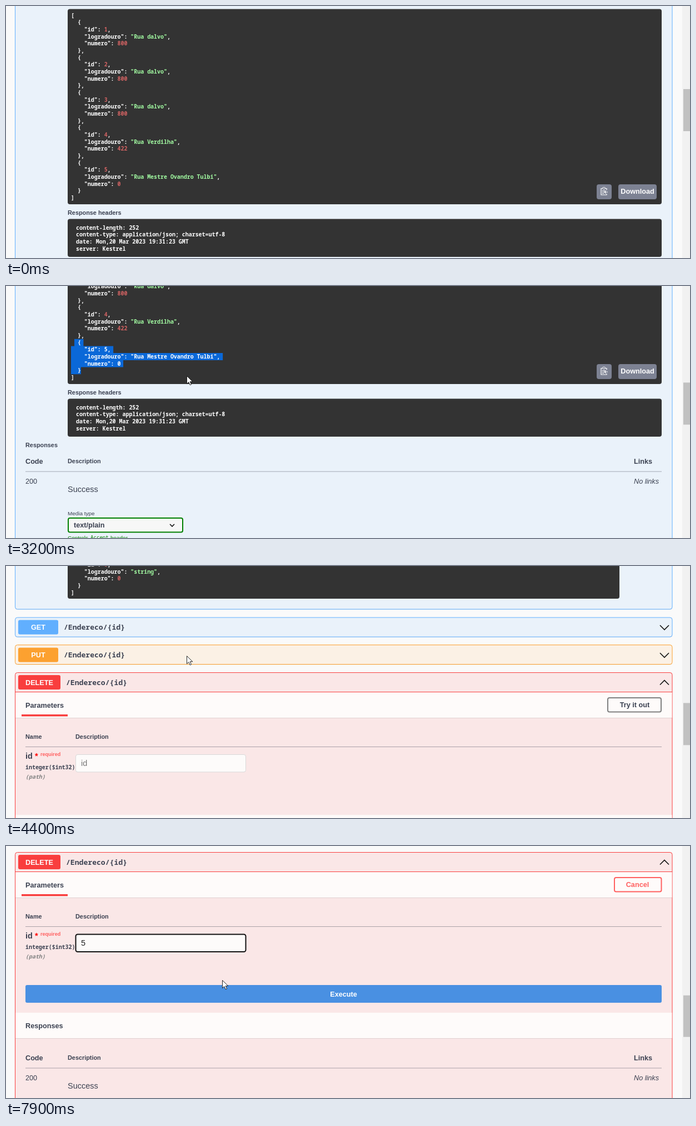
An HTML page for the animation above (8000 ms loop, 1231 by 455 pixels).

```html
<!DOCTYPE html>
<html lang="pt">
<head>
<meta charset="utf-8">
<title>API docs</title>
<style>
  html, body { margin: 0; width: 100%; height: 100%; overflow: hidden; background: #fafafa; }
  svg { display: block; }
  text { font-family: "Liberation Sans", Arial, sans-serif; fill: #3b4151; white-space: pre; }
  .mono { font-family: "Noto Sans Mono", "DejaVu Sans Mono", monospace; }
  .bold { font-weight: 700; }
  .italic { font-style: italic; }
  .mid { text-anchor: middle; }
  .white, .picked tspan { fill: #fff; }
  .str { fill: #a2fca2; }
  .num { fill: #d36363; }
  .green { fill: #008000; }
  .grey { fill: #808080; }
  .red { fill: #f00; }
  .soft { fill: #ff6060; }
</style>
</head>
<body>
<svg id="stage" width="1231" height="455" viewBox="0 0 1231 455"></svg>
<script>
const LOOP = 8000;
const ROW = 12.67, CHAR = 5.97;
const SHIFT = 32.5;
const S10 = 9.05, S11 = 9.95, S12 = 10.86, S14 = 12.67, S16 = 14.48;
const M11 = 9.12, M12 = 9.95, M16 = 13.1;

// Markup helpers; y is the middle of the line of text.
const text = (x, y, size, str, cls = '') =>
  `<text x="${x}" y="${y + size * .36}" font-size="${size}" class="${cls}">${str}</text>`;
const bold = (x, y, size, str, cls = '') => text(x, y, size, str, 'bold ' + cls);
const rect = (x, y, w, h, fill, r = 0, extra = '') =>
  `<rect x="${x}" y="${y}" width="${w}" height="${h}" rx="${r}" fill="${fill}" ${extra}/>`;
const stroke = (d, color, width = 1) =>
  `<path d="${d}" fill="none" stroke="${color}" stroke-width="${width}"/>`;
const rule = y => rect(35, y, 1145, 1, '#3b4151', 0, 'opacity=".42"');
const paint = line => line.replace(/: (".*?"|\d+)/, (_, v) =>
  `: <tspan class="${v[0] === '"' ? 'str' : 'num'}">${v}</tspan>`);
const lines = (x, y, rows, cls = '') => rows.map((row, i) =>
  text(x, y + i * ROW, M12, row, 'mono bold white ' + cls)).join('');
const json = (x, y, rows, cls) => lines(x, y, rows.map(paint), cls);

const record = (id, street, number) => [
  '  {', `    "id": ${id},`, `    "logradouro": "${street}",`, `    "numero": ${number}`, '  }'];
const list = records => ['[', ...records.flatMap((rec, i) =>
  i < records.length - 1 ? [...rec.slice(0, -1), '  },'] : rec), ']'];

const addresses = [
  record(1, 'Rua dalvo', 800),
  record(2, 'Rua dalvo', 800),
  record(3, 'Rua dalvo', 800),
  record(4, 'Rua Verdilha', 422),
  record(5, 'Rua Mestre Ovandro Tulbi', 0)];
const lastRecord = addresses[4];
const lastTop = 17 + 21 * ROW;

const card = (y, h, color, fill, id = '') =>
  rect(16.5, y + 1, 1182.5, h, 'rgba(0,0,0,.07)', 4) +
  rect(16.5, y, 1182.5, h, fill, 4, `stroke="${color}" ${id}`);

const summary = (y, verb, color, width, open) => {
  const dir = open ? -4 : 4;
  return rect(22, y - 13, width, 26, color, 3) +
    bold(22 + width / 2, y, S14, verb, 'mid white') +
    text(width + 32, y, M16, '/Endereco/{id}', 'mono bold') +
    stroke(`M1177 ${y + .5 - dir}l8 ${dir * 2}l8 ${-dir * 2}`, '#111', 1.6);
};

const responseTable = y =>
  bold(35, y, S14, 'Code') + bold(111, y, S12, 'Description') + bold(1130, y, S14, 'Links') +
  rule(y + 18) + text(35, y + 35.5, S14, '200') + text(111, y + 50.5, S16, 'Success') +
  text(1130, y + 35.5, S14, 'No links', 'italic');

const band = (y, title) =>
  rect(17, y, 1181.5, 46, '#fefbfa') + rect(17, y + 46, 1181.5, 1, 'rgba(0,0,0,.1)') +
  bold(35, y + 23, S14, title);

const clipboard =
  rect(1063, 322, 27, 27, '#7d8293', 4) +
  stroke('M1074 329.5h-3v11.5h10v-2M1078 329.5h3v3M1073 333.5h5M1073 336h3M1073 338.5h3M1083 336h-6m2.5-2.5l-2.5 2.5l2.5 2.5', '#fff', 1.2) +
  rect(1073.5, 327.5, 5, 3, 'none', 1, 'stroke="#fff"');

const getCard =
  card(-40, 842, '#61affe', '#eaf2fa') +
  rect(111, 5.5, 1069, 352.5, '#333', 4) +
  json(117, 17, list(addresses)) +
  `<path id="mark" fill="#0a68d8"/><g clip-path="url(#picked)">` +
  json(117, lastTop, lastRecord, 'picked') + '</g>' +
  clipboard + rect(1102, 322, 69, 27, '#7d8293', 4) +
  bold(1136.5, 334.5, S14, 'Download', 'mid white') +
  bold(111, 373, S12, 'Response headers') +
  rect(111, 384.5, 1069, 68.5, '#333', 4) +
  lines(126, 400, ['content-length: 252', 'content-type: application/json; charset=utf-8',
    'date: Mon,20 Mar 2023 19:31:23 GMT', 'server: Kestrel']) +
  bold(35, 468.5, S12, 'Responses') + responseTable(497.5) +
  text(111, 591, S11, 'Media type') +
  rect(112, 600, 206, 25.5, '#f7f7f7', 3, 'stroke="#008000" stroke-width="2"') +
  bold(122, 612.5, S14, 'text/plain') + stroke('M295 611l4 4l4 -4', '#111', 1.6) +
  text(111, 635, S11, 'Controls', 'green') + text(152, 635, M11, 'Accept', 'mono green') +
  text(188, 635, S11, 'header.', 'green') +
  bold(111, 663, S12, 'Example Value') + rect(191.5, 657, 1, 13, '#bcc3cc') +
  text(198, 663, S12, 'Schema') +
  rect(111, 684, 993, 99, '#333', 4) +
  json(117, 696, list([record(0, 'string', 0)]).map(row => row.replace('Rua ', '')));

const deleteCard =
  card(916.5, 430.5, '#f93e3e', '#fae7e7', 'id="deleteBox"') +
  summary(934, 'DELETE', '#f93e3e', 76, true) +
  band(952, 'Parameters') + rect(17, 951, 1182, 1, '#f93e3e') + rect(28, 992, 83, 3.5, '#f93e3e') +
  `<g id="tryButton">${rect(1083, 962, 96, 25.5, 'none', 3, 'stroke="#808080" stroke-width="2"')}
    ${bold(1131.5, 974.7, S14, 'Try it out', 'mid')}</g>` +
  `<g id="cancelButton">${rect(1095, 962, 84.5, 25.5, 'none', 3, 'stroke="#ff6060" stroke-width="2"')}
    ${bold(1136.5, 974.7, S14, 'Cancel', 'mid soft')}</g>` +
  bold(35, 1032, S12, 'Name') + bold(125, 1032, S12, 'Description') + rule(1050) +
  bold(35, 1067, S16, 'id') + bold(52, 1067, S16, '*', 'red') +
  bold(62, 1064, S10, 'required', 'soft') +
  text(35, 1087, M12, 'integer($int32)', 'mono bold') +
  text(35, 1104, M12, '(path)', 'mono bold italic grey') +
  rect(125.5, 1064.5, 306, 31.5, '#fdfbfa', 3.5, 'id="field"') +
  `<text id="value" x="135" y="${1080 + S16 * .36}" font-size="${S16}"></text>` +
  rect(135, 1072, 1, 16, '#000', 0, 'id="caret"') +
  `<g id="execute">${rect(35, 1156, 1145, 32, '#4990e2', 3)}
    ${bold(607.5, 1172, S14, 'Execute', 'mid white')}</g>` +
  `<g id="below">${band(1173.5, 'Responses')}${responseTable(1255)}</g>`;

const pointers =
  `<path id="arrow" d="M.5 .5V14.6L3.8 11.5L6.2 16.8L8.5 15.8L6.2 10.7H10.8Z" fill="#fff" stroke="#111" stroke-width=".9"/>
   <path id="beam" d="M-3 -7.5H-.8L0 -7L.8 -7.5H3M0 -7V7M-3 7.5H-.8L0 7L.8 7.5H3" fill="none" stroke="#111"/>
   <path id="hand" d="M-1.5 9V1.5Q0 -.8 1.5 1.5V6L4 6.5L7.5 8Q9 9 8.5 12L7 17H-.5L-5 10.5Q-4.5 8.5 -1.5 11Z" fill="#fff" stroke="#111"/>`;

document.getElementById('stage').innerHTML =
  '<defs><clipPath id="picked"><path id="clip"/></clipPath></defs>' +
  rect(0, 0, 1231, 455, '#fafafa') +
  `<g id="page">${getCard}
    ${card(817, 35, '#61affe', '#eaf2fa')}${summary(834.5, 'GET', '#61affe', 72)}
    ${card(866.5, 35, '#fca130', '#fbf1e5')}${summary(884.5, 'PUT', '#fca130', 72)}
    ${deleteCard}</g>` +
  rect(1217, 0, 14, 455, '#f1f1f1') + rect(1219, 150, 12, 76, '#c1c1c1', 0, 'id="thumb"') +
  `<g id="pointer">${pointers}</g>`;

// Steps: [time, ...values], each held until the next.
const scrollSteps = [[0, 0], [3200, 181], [3400, 271.5], [3700, 362], [3800, 452.5],
  [4000, 543], [4400, 724], [4500, 905]];
const pointerSteps = [[0, -50, -50],
  [200, 199, 50], [300, 189, 95], [400, 172, 150], [500, 150, 205],
  [600, 124, 248], [700, 99, 272], [800, 109, 284], [900, 123, 285],
  [1200, 129, 284], [1300, 134, 292], [1400, 143, 300], [1500, 157, 309], [1600, 173, 319],
  [1700, 187, 327.5], [1900, 190, 331], [2000, 191, 333],
  [2300, 222, 298], [2400, 268, 240], [2500, 306, 188], [2600, 325, 162],
  [4900, 285, 179], [5000, 246, 194],
  [5200, 556, 176], [5300, 745, 140], [5400, 930, 102], [5500, 1060, 79], [5600, 1118, 70],
  [5800, 1122, 72], [5900, 1080, 102], [6000, 985, 135],
  [6200, 800, 160], [6300, 590, 184], [6400, 420, 184], [6500, 330, 177],
  [7800, 355, 212], [7900, 389, 242]];
const TRY = 5700, FOCUS = 6500, TYPED = 7200;

const at = (steps, t) => steps.findLast(step => step[0] <= t).slice(1);
const within = (t, from, to) => t >= from && t < to;
const el = Object.fromEntries([...document.querySelectorAll('[id]')].map(e => [e.id, e]));
const set = (e, attrs) => Object.entries(attrs).forEach(([key, v]) => e.setAttribute(key, v));
const show = (e, on) => set(e, { visibility: on ? 'visible' : 'hidden' });

function selection(t) {
  if (t < 1200) return '';
  const [x, y] = at(pointerSteps, Math.min(t, 2000));
  const top = lastTop - ROW / 2;
  const end = Math.min(4, Math.floor((y - top) / ROW));
  return lastRecord.slice(0, end + 1).map((row, i) => {
    const left = i ? 117 : 117 + CHAR;
    const cols = Math.min(row.length, Math.round((x - 117) / CHAR));
    const right = i < end ? 117 + row.length * CHAR + 4.5 : 117 + cols * CHAR;
    return `M${left} ${top + i * ROW}H${right}v${ROW + .2}H${left}Z`;
  }).join('');
}

function render(t) {
  const [scroll] = at(scrollSteps, t), [x, y] = at(pointerSteps, t);
  const open = t >= TRY, focused = t >= FOCUS, typed = t >= TYPED;

  set(el.page, { transform: `translate(0 ${-scroll})` });
  set(el.thumb, { y: 150 + scroll * .1345 - (open ? 2 : 0), height: open ? 75 : 76 });

  const marked = selection(t);
  set(el.mark, { d: marked });
  set(el.clip, { d: marked });

  show(el.tryButton, !open);
  show(el.cancelButton, open);
  show(el.execute, open);
  set(el.below, { transform: `translate(0 ${open ? SHIFT : 0})` });
  set(el.deleteBox, { height: 430.5 + (open ? SHIFT : 0) });

  set(el.field, { stroke: focused ? '#101010' : '#d9d9d9', 'stroke-width': focused ? 2 : 1 });
  el.value.textContent = typed ? '5' : 'id';
  el.value.style.fill = typed ? '#222' : '#757575';
  show(el.caret, within(t, FOCUS, 7000) || within(t, TYPED, 7800));
  set(el.caret, { x: typed ? 144 : 135 });

  const overField = t >= 4500 && within(x, 125, 432) && within(y, 159, 192);
  const overButton = t >= 4500 && within(x, 1082, 1180) && within(y, 57, 84);
  set(el.pointer, { transform: `translate(${x} ${y})` });
  show(el.beam, overField);
  show(el.hand, overButton);
  show(el.arrow, !overField && !overButton);
}

const start = performance.now();
function tick() {
  render((performance.now() - start) % LOOP);
  requestAnimationFrame(tick);
}
tick();
</script>
</body>
</html>
```
